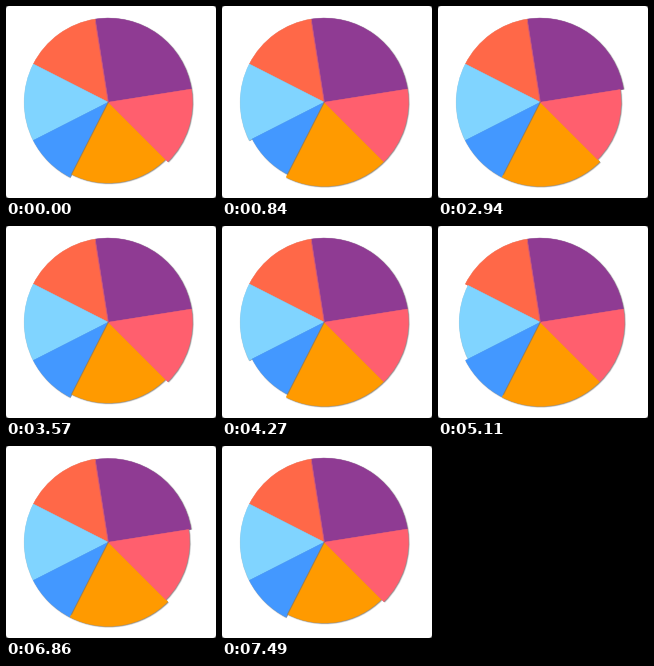
A matplotlib script that plays this animation: 210 by 192 pixels, repeating every 7.98 s.

```python
import numpy as np
import matplotlib.pyplot as plt
from matplotlib.animation import FuncAnimation
from matplotlib.patches import FancyBboxPatch, Wedge

W, H, DPI = 210, 192, 100
STEP, LOOP = 70, 7980
CX, CY = 102.3, H - 96.2
R_FULL, R_SMALL = 84.1, 80.8

PURPLE, CORAL, SKY, BLUE, ORANGE, RED = range(6)
COLORS = ["#8f3b93", "#ff6848", "#80d4ff", "#4398ff", "#ff9a00", "#ff5f6e"]
SHARES = [25, 15, 15, 10, 20, 15]
ANGLES = 9 + 3.6 * np.concatenate([[0], np.cumsum(SHARES)])

# (start in ms, slice that becomes active, steps of the transition)
EVENTS = [
    (770, BLUE, 2), (910, SKY, 4), (1470, CORAL, 4), (2170, PURPLE, 3),
    (2730, RED, 4), (3500, ORANGE, 2), (4130, BLUE, 4), (4970, SKY, 5),
    (5600, CORAL, 3), (6160, PURPLE, 3), (6790, RED, 4), (7350, ORANGE, 3),
]

# shadow layers: (extra radius, opacity)
SHADOW = [(1.0, 0.12), (0.5, 0.22), (0.0, 0.35)]

fig = plt.figure(figsize=(W / DPI, H / DPI), dpi=DPI, facecolor="#4a4a4a")
ax = fig.add_axes([0, 0, 1, 1])
ax.set(xlim=(0, W), ylim=(0, H))
ax.axis("off")
ax.add_patch(FancyBboxPatch((0, 0), W, H, fc="white", ec="none",
                            boxstyle="round,pad=0,rounding_size=3.5"))


def wedge(i, center, **style):
    return ax.add_patch(Wedge(center, R_FULL, ANGLES[i], ANGLES[i + 1], **style))


def seam(i, color, alpha):
    a = np.radians(ANGLES[i])
    ax.plot([CX, CX + R_SMALL * np.cos(a)], [CY, CY + R_SMALL * np.sin(a)],
            color=color, alpha=alpha, lw=0.8, zorder=4)


shadows = [[wedge(i, (CX + 0.6, CY - 0.5), fc="#303030", ec="none",
                  alpha=alpha, zorder=2) for _, alpha in SHADOW]
           for i in range(6)]
slices = [wedge(i, (CX, CY), fc=c, ec=c, lw=0.3, joinstyle="round", zorder=3)
          for i, c in enumerate(COLORS)]
seam(CORAL, "#b8509a", 0.6)
seam(ORANGE, "#5a6a80", 0.5)


def shrink_amounts(t):
    """How far each slice is pulled in, from 0 to 1."""
    k = sum(start <= t for start, _, _ in EVENTS) - 1
    start, active, steps = EVENTS[k]
    if k < 0:
        t += LOOP
    u = min((t - start + STEP) / (steps * STEP), 1)
    p = 1 - (1 - u) ** 3
    amounts = np.zeros(6)
    amounts[EVENTS[k - 1][1]] = 1 - p
    amounts[active] = p
    return amounts


def update(n):
    for i, s in enumerate(shrink_amounts(n * STEP)):
        r = R_FULL + (R_SMALL - R_FULL) * s
        slices[i].set_radius(r)
        for layer, (extra, _) in zip(shadows[i], SHADOW):
            layer.set_radius(r + extra)
    return slices


anim = FuncAnimation(fig, update, frames=LOOP // STEP, interval=STEP,
                     repeat=True, repeat_delay=0, blit=False)
plt.show()
```
